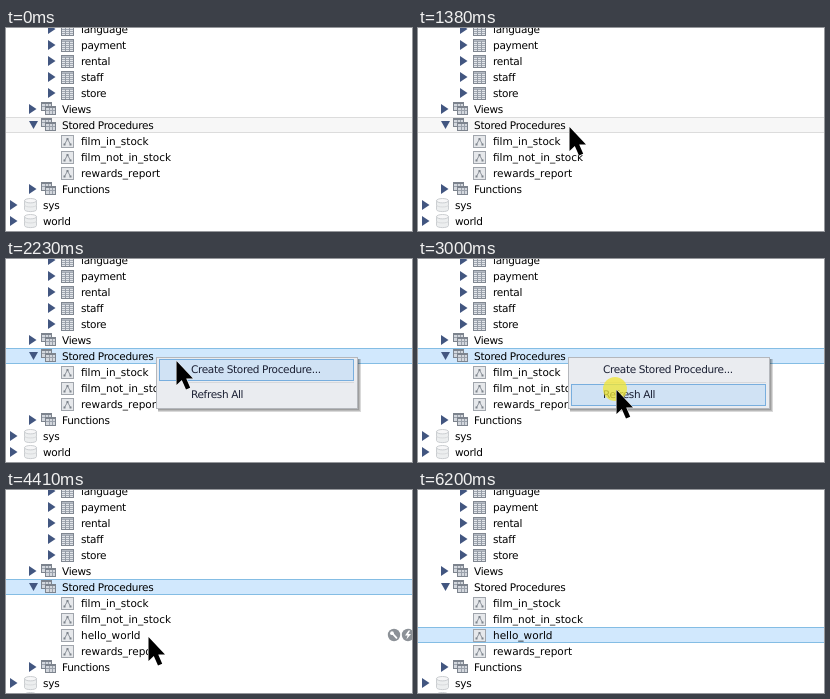
An HTML page for the animation above (6810 ms loop, 406 by 203 pixels).

```html
<!DOCTYPE html>
<html lang="en">
<head>
<meta charset="utf-8">
<title>Stored procedures tree</title>
<style>
  html, body { margin: 0; width: 100%; height: 100%; overflow: hidden; background: #fff; }
  svg { display: block; width: 406px; height: 203px; }
  text {
    font: 10.5px "DejaVu Sans", Verdana, sans-serif;
    letter-spacing: -.27px;
    text-rendering: geometricPrecision;
    fill: #000;
  }
  text.id { letter-spacing: 0; }
  #menu text { fill: #1a1f33; letter-spacing: -.35px; }
  .crisp { shape-rendering: crispEdges; }
</style>
</head>
<body>
<svg id="stage" width="406" height="203" viewBox="0 0 406 203"></svg>
<script>
const LOOP = 6810;
const REFRESHED = 3320;

const rect = (x, y, w, h, fill, extra = '') =>
  `<rect x="${x}" y="${y}" width="${w}" height="${h}" fill="${fill}" ${extra}/>`;
const path = (d, extra) => `<path d="${d}" ${extra}/>`;
const at = (x, y, body) => `<g transform="translate(${x} ${y})">${body}</g>`;
const label = (x, y, s) =>
  `<text x="${x}" y="${y + 4}"${s.includes('_') ? ' class="id"' : ''}>${s}</text>`;

const closed = (x, y) => path(`M${x} ${y - 5}l7.5 5l-7.5 5z`, 'fill="#425680"');
const opened = (x, y) => path(`M${x} ${y - 4}h9l-4.5 8z`, 'fill="#425680"');

const tableIcon = at(55, -6, `<g class="crisp">` +
  rect(0, 0, 13, 13, '#808791') + rect(1, 1, 11, 11, '#e3e6ea') + rect(1, 1, 11, 1, '#b4bac3') +
  [2, 4, 6, 8, 10].map(y => rect(1, y, 11, 1, '#a2a9b3')).join('') +
  rect(4, 2, 1, 10, '#959ca6') + rect(8, 2, 1, 10, '#959ca6') + '</g>');

const pane = (x, y) => at(x, y, rect(0, 0, 11, 9, '#7d848e') + rect(1, 2, 9, 6, '#d3d7dd') +
  rect(4, 2, 1, 6, '#9aa1ab') + rect(7, 2, 1, 6, '#9aa1ab') + rect(1, 4, 9, 1, '#9aa1ab'));
const folderIcon = at(35, -7, `<g class="crisp">${pane(0, 0)}${pane(4, 4)}</g>`);

const procIcon = at(55, -6,
  rect(.5, .5, 12, 12, '#e6e8eb', 'stroke="#a0a5ac"') +
  path('M3.5 9.5L6.5 4L9.5 9.5', 'fill="none" stroke="#8f959d"') +
  rect(5.5, 3, 2, 2, '#7d838b') + rect(2.5, 8.5, 2, 2, '#7d838b') + rect(8.5, 8.5, 2, 2, '#7d838b'));

const baseIcon = at(18, -7,
  path('M.5 2.5v9c0 2.8 12 2.8 12 0v-9z', 'fill="#eceeef" stroke="#cbced1"') +
  '<ellipse cx="6.5" cy="2.7" rx="6" ry="2.2" fill="#f7f7f8" stroke="#cbced1"/>' +
  path('M.5 7c0 2.6 12 2.6 12 0', 'fill="none" stroke="#d8dadc"'));

const tableRow = (s, y) => closed(42, y) + at(0, y, tableIcon) + label(75, y, s);
const folderRow = (s, y, arrow = closed) => arrow(23, y) + at(0, y, folderIcon) + label(56, y, s);
const procRow = (s, y) => at(0, y, procIcon) + label(75, y, s);
const baseRow = (s, y) => closed(4, y) + at(0, y, baseIcon) + label(37, y, s);

function tail(procs) {
  const end = 113 + procs.length * 16;
  return procs.map((s, i) => procRow(s, 113 + i * 16)).join('') +
    folderRow('Functions', end) + baseRow('sys', end + 16) + baseRow('world', end + 32);
}

const tools = '<circle cx="388" r="6.2" fill="#8c9197"/><circle cx="402" r="6.2" fill="#8c9197"/>' +
  path('M386 -2L390.5 2.8', 'stroke="#fff" stroke-width="1.8" stroke-linecap="round"') +
  '<circle cx="386" cy="-1.8" r="1.9" fill="#fff"/>' +
  path('M402.5 -4.5l-3.5 5h2.6l-1.2 4l4.6 -5.4h-2.8l2 -3.6z', 'fill="#fff"');

const menu =
  [4, 3, 2, 1].map(d => rect(152, 100, 199 + d, 49 + d, '#000', 'opacity=".15"')).join('') +
  rect(150.5, 98.5, 201, 51, '#eaecf0', 'stroke="#b4b7bc"') +
  rect(182, 123, 166, 1, '#d6d8dc') +
  rect(153.5, 0, 194, 21, '#d0e2f4', 'id="item" stroke="#78aede"') +
  label(185, 110, 'Create Stored Procedure...') + label(185, 135, 'Refresh All');

const $ = id => document.getElementById(id);

$('stage').innerHTML =
  rect(0, 0, 406, 203, '#fff') +
  '<g id="select" class="crisp">' + rect(0, 0, 406, 16, '', 'id="edge"') +
  rect(0, 1, 406, 14, '', 'id="fill"') + '</g>' +
  ['language', 'payment', 'rental', 'staff', 'store'].map((s, i) => tableRow(s, 1 + i * 16)).join('') +
  folderRow('Views', 81) + folderRow('Stored Procedures', 97, opened) +
  `<g id="before">${tail(['film_in_stock', 'film_not_in_stock', 'rewards_report'])}</g>` +
  `<g id="after">${tail(['film_in_stock', 'film_not_in_stock', 'hello_world', 'rewards_report'])}</g>` +
  `<g id="tools">${tools}</g><g id="menu">${menu}</g>` +
  '<circle id="click" r="12" fill="#f0e632" opacity=".75"/>' +
  '<g id="cursor">' + path('M1.5 1V25L6.8 20.1L11 29.5L15.2 27.7L11.2 18.5H18z',
    'fill="#000" stroke="#fff" stroke-width="1" paint-order="stroke"') + '</g>';

const inOut = p => (1 - Math.cos(Math.PI * p)) / 2;
const out = p => 1 - (1 - p) ** 2;
const lateIn = p => p ** 2.5;

// start, end, steps, target x, target y, easing
const moves = [
  [230, 840, 9, 154, 102, inOut],
  [920, 1070, 3, 151, 100, out],
  [1300, 1380, 2, 150, 98, out],
  [2230, 2230, 1, 169, 101, out],
  [2310, 2390, 2, 187, 108, out],
  [2540, 2770, 4, 197, 130, inOut],
  [4020, 4410, 6, 141, 146, inOut],
  [5660, 6200, 8, 412, 206, lateIn],
];

// time, x, y of each click
const clicks = [[1530, 150, 98], [3000, 197, 130], [4560, 141, 146]];

function cursorAt(t) {
  let x = 412, y = 204;
  for (const [t0, t1, n, tx, ty, ease] of moves) {
    if (t < t0) break;
    const k = t >= t1 ? n : 1 + Math.floor((t - t0) / (t1 - t0) * (n - 1));
    const p = ease(k / n);
    x += (tx - x) * p;
    y += (ty - y) * p;
  }
  return [Math.round(x), Math.round(y)];
}

const show = (id, on) => $(id).setAttribute('visibility', on ? 'visible' : 'hidden');
const place = (id, x, y) => $(id).setAttribute('transform', `translate(${x} ${y})`);

function draw(t) {
  const [x, y] = cursorAt(t);
  place('cursor', x, y);

  const active = t >= 1530;
  place('select', 0, t < 4560 ? 89 : 137);
  $('edge').setAttribute('fill', active ? '#84bde4' : '#dcdcdc');
  $('fill').setAttribute('fill', active ? '#d1e8fd' : '#f7f7f7');

  const fresh = t >= REFRESHED;
  show('before', !fresh);
  show('after', fresh);

  const menuOn = t >= 1700 && t < 3170;
  show('menu', menuOn);
  show('item', menuOn && t >= 2230);
  $('item').setAttribute('y', y > 122 ? 125.5 : 100.5);

  const row = Math.floor((y - 105) / 16);
  const hover = x < 406 && row >= 0 && row < (fresh ? 4 : 3);
  show('tools', hover && (t < 1530 || t >= 3170));
  place('tools', 0, 113 + row * 16);

  const click = clicks.find(([c]) => t >= c && t < c + 170);
  show('click', click);
  if (click) place('click', click[1], click[2]);
}

const start = performance.now();
function tick() {
  draw((performance.now() - start) % LOOP);
  requestAnimationFrame(tick);
}
tick();
</script>
</body>
</html>
```
